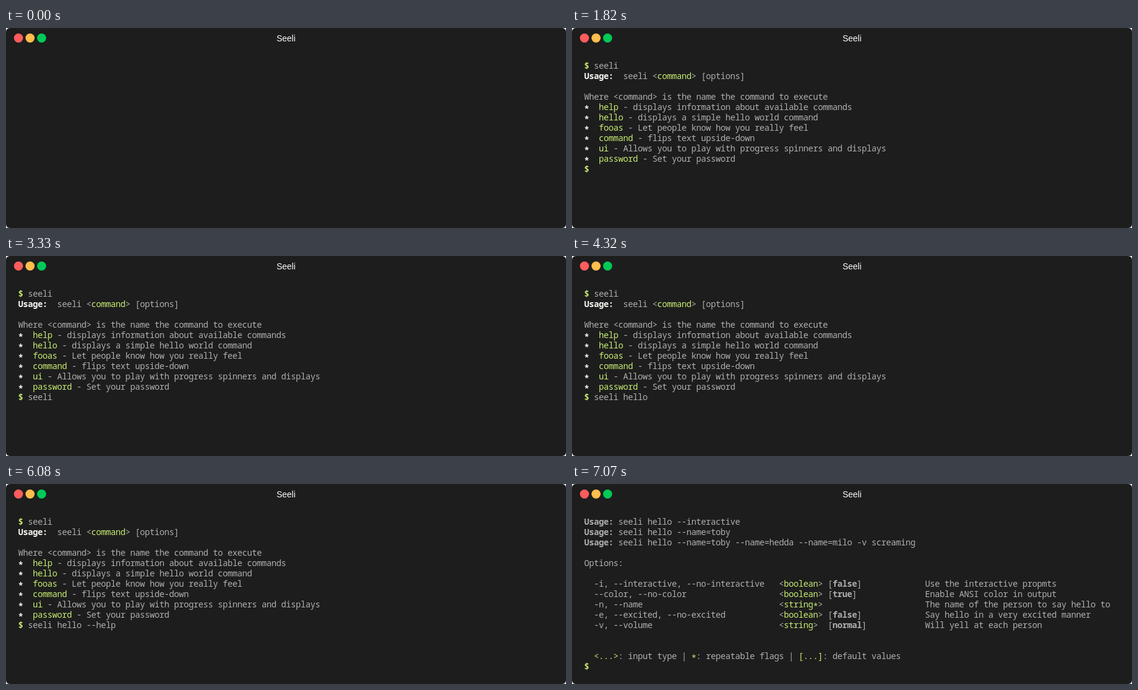
Animation of 920 by 329 pixels, one loop 8 s. Source, as an HTML page:

```html
<!DOCTYPE html>
<html lang="en">
<head>
<meta charset="utf-8">
<title>Seeli</title>
<style>
html, body { margin: 0; width: 100%; height: 100%; overflow: hidden; background: #fff; }
svg { display: block; }
#screen { font: 14px "Noto Sans Mono", "DejaVu Sans Mono", monospace; letter-spacing: -0.4px; fill: #afafaf; }
#screen text { white-space: pre; }
#screen .g, #screen .p { fill: #c8ed71; }
#screen .w { fill: #f9f9f4; }
.p, .w, .b { font-weight: 700; }
.title { font: 14px "Liberation Sans", Arial, sans-serif; fill: #fff; text-anchor: middle; }
</style>
</head>
<body>
<svg width="920" height="329" viewBox="0 0 920 329">
  <rect width="920" height="329" rx="6" fill="#1d1d1d"/>
  <circle cx="20.5" cy="16.5" r="7.5" fill="#ff5c5c"/>
  <circle cx="39.5" cy="16.5" r="7.5" fill="#ffbd4c"/>
  <circle cx="58.5" cy="16.5" r="7.5" fill="#00ca56"/>
  <text class="title" x="460" y="22">Seeli</text>
  <g id="screen"></g>
</svg>
<script>
const LOOP = 8000, CELL = 8, LINE = 17, LEFT = 20, BASE = 67;
const screen = document.getElementById('screen');

// Styled runs: {g green} {p prompt} {w bright bold} {b bold}, the letter directly before the text
const PROMPT = '{p$} ';
const item = (name, about) => `{w*}  {g${name}} - ${about}`;
const usage = [
  '{wUsage:}  seeli <{gcommand}> [options]',
  '',
  'Where <command> is the name the command to execute',
  item('help', 'displays information about available commands'),
  item('hello', 'displays a simple hello world command'),
  item('fooas', 'Let people know how you really feel'),
  item('command', 'flips text upside-down'),
  item('ui', 'Allows you to play with progress spinners and displays'),
  item('password', 'Set your password')
];

const plain = s => s.replace(/\{\w([^}]*)\}/g, '$1');
const pad = (s, n) => s + ' '.repeat(n - plain(s).length);
const option = (flags, type, value, about) =>
  pad('  ' + flags, 40) + pad(`<${type}>`, 10) + pad(value && `[{b${value}}]`, 20) + about;
const help = [
  '{bUsage:} seeli hello --interactive',
  '{bUsage:} seeli hello --name=toby',
  '{bUsage:} seeli hello --name=toby --name=hedda --name=milo -v screaming',
  '',
  'Options:',
  '',
  option('-i, --interactive, --no-interactive', '{gboolean}', 'false', 'Use the interactive propmts'),
  option('--color, --no-color', '{gboolean}', 'true', 'Enable ANSI color in output'),
  option('-n, --name', '{gstring}{g*}', '', 'The name of the person to say hello to'),
  option('-e, --excited, --no-excited', '{gboolean}', 'false', 'Say hello in a very excited manner'),
  option('-v, --volume', '{gstring}', 'normal', 'Will yell at each person'),
  '',
  '',
  '  {g<...>}: input type | {g*}: repeatable flags | {g[...]}: default values'
];

// Keystrokes as [time, text]
const first = [[1050, 's'], [1170, 'ee'], [1280, 'l'], [1400, 'i']];
const second = [
  [2970, 's'], [3035, 'ee'], [3100, 'l'], [3330, 'i'],
  [3710, ' h'], [3930, 'e'], [4020, 'l'], [4200, 'l'], [4320, 'o'],
  ...[...'--help'].map((c, i) => [5550 + i * 106, i ? c : ' ' + c])
];
const typed = (keys, t) => PROMPT + keys.filter(k => k[0] <= t).map(k => k[1]).join('');

function linesAt(t) {
  if (t < 790) return [];
  if (t < 1820) return [typed(first, t)];
  if (t < 6970) return [typed(first, t), ...usage, typed(second, t)];
  return t < 7070 ? help : [...help, PROMPT];
}

function drawLine(line, row) {
  let col = 0;
  for (const [run, style, styled] of line.matchAll(/\{(\w)([^}]*)\}|[^{]+/g)) {
    const text = styled ?? run;
    const el = document.createElementNS('http://www.w3.org/2000/svg', 'text');
    el.setAttribute('x', LEFT + col * CELL);
    // The asterisk sits at mid-height
    el.setAttribute('y', BASE + row * LINE + (text === '*' ? 3 : 0));
    if (style) el.setAttribute('class', style);
    el.textContent = text;
    screen.append(el);
    col += text.length;
  }
}

let shown = null;
function draw(now) {
  const lines = linesAt(now % LOOP);
  const key = lines.join('\n');
  if (key !== shown) {
    shown = key;
    screen.replaceChildren();
    lines.forEach(drawLine);
  }
  requestAnimationFrame(draw);
}
requestAnimationFrame(draw);
</script>
</body>
</html>
```
